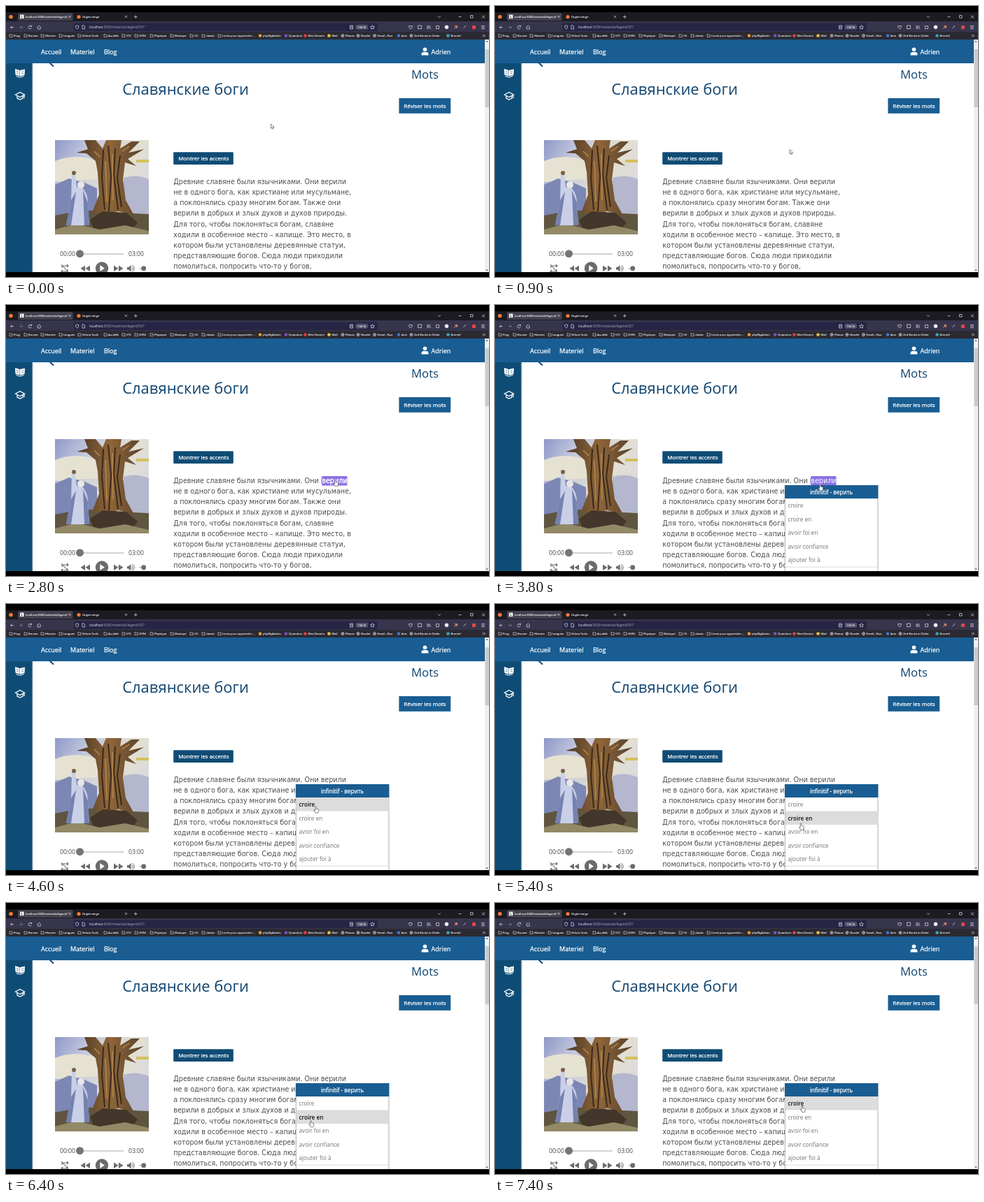
An HTML page that plays this animation: 690x388 px, repeating every 8 s.

```html
<!DOCTYPE html>
<html lang="fr">
<head>
<meta charset="utf-8">
<title>Lecture</title>
<style>
html, body { margin: 0; width: 100%; height: 100%; overflow: hidden; background: #000; }
svg { display: block; width: 100%; height: 100%; }
text { font-family: "Open Sans", "Noto Sans", sans-serif; white-space: pre; }
.chrome text { fill: #f6f6f9; font-size: 4.1px; stroke: #f6f6f9; stroke-width: .1; }
.chrome .tab { font-size: 3.9px; }
.line { fill: none; stroke: #e4e4ea; stroke-width: .8; }
.nav { fill: #fff; font-size: 9px; }
.nav text, .btn { stroke: #fff; stroke-width: .25; }
.head { fill: #0f4470; text-anchor: middle; }
.btn { fill: #fff; font-size: 8px; text-anchor: middle; }
.story text { font: 9.6px "DejaVu Sans", Verdana, sans-serif; fill: #4c4c4c; }
.audio text { font-size: 8.6px; fill: #444; }
.row { font-size: 8.2px; fill: #737373; }
.row.on { font-weight: 600; fill: #111; }
</style>
</head>
<body>
<svg viewBox="0 0 690 388">
  <defs>
    <linearGradient id="sky" x2="1" y2=".6">
      <stop stop-color="#8f98c8"/><stop offset=".3" stop-color="#c3c8de"/>
      <stop offset=".65" stop-color="#e3dfd0"/><stop offset="1" stop-color="#d9d9e2"/>
    </linearGradient>
    <linearGradient id="bark" x2="1">
      <stop stop-color="#4d3826"/><stop offset=".5" stop-color="#8f6638"/><stop offset="1" stop-color="#54402e"/>
    </linearGradient>
    <linearGradient id="edge"><stop stop-color="#0f4c75" stop-opacity=".45"/><stop offset="1" stop-color="#0f4c75" stop-opacity="0"/></linearGradient>
    <clipPath id="frame"><rect x="70" y="192" width="134" height="135"/></clipPath>
    <path id="folder" class="line" d="M0 0h1.6l.6.7h2v3.1H0z" style="stroke-width:.6"/>
    <g id="globe" class="line" style="stroke-width:.5"><circle cx="2" cy="2" r="2.1"/><ellipse cx="2" cy="2" rx=".9" ry="2.1"/><path d="M0 2h4"/></g>
  </defs>

  <!-- page -->
  <rect y="48" width="690" height="333" fill="#fff"/>
  <path d="M69 76l-7 5 6 5.5" fill="none" stroke="#0f4470" stroke-width="1.8"/>
  <rect y="82" width="37.5" height="299" fill="#0f4c75"/>
  <rect x="37.5" y="82" width="2" height="299" fill="url(#edge)"/>
  <rect y="48" width="684" height="34" fill="#195d92"/>
  <g class="nav">
    <text x="50" y="68.5">Accueil</text>
    <text x="92" y="68.5">Materiel</text>
    <text x="140" y="68.5">Blog</text>
    <text x="607.5" y="68.5">Adrien</text>
    <circle cx="598.5" cy="62.3" r="2.8"/>
    <path d="M593.5 70.5v-1.6q0-3 3-3h4q3 0 3 3v1.6z"/>
  </g>
  <g fill="#fff">
    <path d="M13 90l6.500 2v8.500l-6-2zM20 92l7-1.500-.5 8.500-6.500 1.500z"/>
    <path d="M14.500 100.500l5 1.600 6-1.600" fill="none" stroke="#fff"/>
    <path d="M15 93.500l3 .8M15 96l3 .8M22 94.500l3-.7M22 97l3-.7" stroke="#0f4c75" stroke-width=".6"/>
    <path d="M13.500 127l6.500-3.500 6.500 3.500-6.500 3.500zM16 129v3l4 2 4-2v-3M26 127v5" fill="none" stroke="#fff" stroke-width="1.300"/>
  </g>
  <rect x="684" y="48" width="6" height="333" fill="#f0f0f0"/>
  <rect x="684.5" y="62" width="5.5" height="83" fill="#cbcbcb"/>
  <path d="M685.300 51.500l1.700-2 1.700 2zM685.300 377.500l1.700 2 1.700-2z" fill="#555"/>

  <text class="head" x="256.5" y="127" font-size="21.9">Славянские боги</text>
  <text class="head" x="598.5" y="103.5" font-size="16.7">Mots</text>
  <rect x="561.4" y="132" width="73.800" height="21.800" fill="#195d92"/>
  <text class="btn" x="598.5" y="145.700">Réviser les mots</text>
  <rect x="239.2" y="209.300" width="85.600" height="17.600" rx="1.2" fill="#0f4c75"/>
  <text class="btn" x="282.3" y="221" style="font-size:7.9px">Montrer les accents</text>

  <!-- painting -->
  <g clip-path="url(#frame)">
    <rect x="70" y="192" width="134" height="135" fill="url(#sky)"/>
    <path d="M70 222q28-12 62 0v26l-62 4z" fill="#e6e2d2"/>
    <path d="M70 256l20-9 22 6 18 8v46H70z" fill="#7c87b4"/>
    <path d="M168 246q18-6 36 2v54h-36z" fill="#b4b7cd"/>
    <path d="M186 220h18v4h-18z" fill="#d3c05c"/>
    <path d="M70 300l40-8 50 4 44 2v29H70z" fill="#5f5540"/>
    <path d="M112 192h16l10 12 5-12h22l-2 12 16-10h12l-16 16 22-5-23 14 12 10-16-5-3 24 4 30 12 22-22-6-22 4-16-2 10-26-2-32-3-16-13-11-14-1 16-5z" fill="url(#bark)"/>
    <path d="M139 206l-2 40 4 46M146 200l4 44-3 50M156 204l-2 38 6 50M163 214l-4 32 6 42" fill="none" stroke="#3a2a1d" stroke-width="2"/>
    <path d="M142 222l2 58M152 212l1 66M134 216l-8-8M166 208l10-7" fill="none" stroke="#b98b50" stroke-width="1.400"/>
    <path d="M120 306l18-12 34 2 16 14-10 12h-52z" fill="#43362a"/>
    <path d="M70 320l30-8 34 8 36-6 34 8v5H70z" fill="#928a66"/>
    <path d="M94 241l5-1 2 19 8 1q8 8 8 22l2 32H86l7-36z" fill="#c9cfe6"/>
    <path d="M100 266l-7 48h-7l7-36zM110 264l2 50h7l-2-32z" fill="#7581b0"/>
    <circle cx="107" cy="256" r="5" fill="#e9e6e5"/>
    <circle cx="97" cy="239" r="3" fill="#7b5f46"/>
  </g>

  <!-- player -->
  <g class="audio" fill="#6b6b6b">
    <text x="77" y="358.3">00:00</text>
    <text x="175" y="358.3">03:00</text>
    <path d="M105 355h63" stroke="#a6a6a6" stroke-width="1.2"/>
    <circle cx="105.5" cy="354.7" r="5.5" fill="#757575"/>
    <path d="M80 375v-3h8M87 370l2 2-2 2M88 377v3h-8M81 378l-2 2 2 2M79 370l10 11" fill="none" stroke="#666" stroke-width="1.1"/>
    <path d="M113 371.5v8.5l-6.5-4.2zM120 371.5v8.5l-6.5-4.2zM154 371.5v8.5l6.5-4.2zM161 371.5v8.5l6.5-4.2z"/>
    <circle cx="137" cy="375.5" r="9.2"/>
    <path d="M134.3 371v9l6.5-4.5z" fill="#fff"/>
    <path d="M173 374h2.2l3.3-3v9.5l-3.3-3H173z"/>
    <path d="M180 373.5q2 2.300 0 4.600M180.500 371q5.500 4.700 0 9.500" fill="none" stroke="#6b6b6b"/>
    <path d="M190 375.8h10" stroke="#a6a6a6"/>
    <circle cx="196.7" cy="375.7" r="3.4"/>
  </g>

  <g class="story" id="story"></g>
  <g id="hover">
    <rect x="451" y="245" width="36.5" height="13.5" rx="1.5" fill="#8b70e6"/>
    <g class="story"><text id="word" x="451.3" y="255.3" style="fill:#fff;stroke:#fff">верили</text></g>
  </g>

  <g id="popup">
    <rect x="414.2" y="258.5" width="132.8" height="126" fill="#fff" stroke="#8c8c8c" stroke-width=".7"/>
    <rect x="414" y="258" width="133.3" height="19" fill="#195d92"/>
    <text class="btn" x="480.6" y="270.5" style="font-size:8.1px">infinitif - верить</text>
    <rect id="mark" x="414.6" width="132" height="19.5" fill="#dcdcdc"/>
    <path d="M414.5 375.2h132.5" stroke="#ccc" stroke-width=".7"/>
  </g>
  <rect y="381" width="690" height="7"/>

  <!-- browser -->
  <g class="chrome">
    <rect width="690" height="9"/>
    <rect y="9" width="690" height="13.5" fill="#1c1b22"/>
    <rect y="22" width="690" height="15" fill="#37354c"/>
    <rect y="37" width="690" height="11" fill="#2b2a33"/>
    <rect x="17" y="10" width="78.5" height="11" rx="1.5" fill="#42414d"/>
    <rect x="97" y="24.5" width="434" height="11.5" rx="1.5" fill="#272545"/>
    <circle cx="7" cy="15.5" r="2.8" fill="#ef7a35"/>
    <rect x="20" y="12.5" width="5.5" height="5.5" fill="#fff"/>
    <path d="M22 13.5v3.2h2" fill="none" stroke="#222" stroke-width=".7"/>
    <text class="tab" x="28" y="16.8">localhost:3000/materials/legend/</text>
    <circle cx="104" cy="15.5" r="2.6" fill="#ef7a35"/>
    <text class="tab" x="109" y="16.8">Onglet vierge</text>
    <g class="line" style="stroke-width:.7">
      <path d="M89.5 13.8l3 3m0-3l-3 3M170 13.8l3 3m0-3l-3 3M183 15.5h4.5m-2.25-2.25v4.5"/>
      <path d="M617 14.5l2 2 2-2M646.5 15.5h4M663.5 13.5h3.5v3.5h-3.5zM680 13.5l4 4m0-4l-4 4"/>
      <path d="M11 30.5H6.5m2-2l-2 2 2 2"/>
      <path d="M19 30.5h4.5m-2-2l2 2-2 2" stroke="#85858d"/>
      <path d="M36.3 29.3a2.3 2.3 0 1 0 .1 2.3M36.6 27.6v2h-2"/>
      <path d="M44.5 30.5l2.7-2.5 2.7 2.5M45.3 30v3h3.8v-3"/>
      <path d="M99.5 28.5l2.2-.8 2.2.8q0 3.5-2.2 4.8-2.2-1.3-2.2-4.8z"/>
      <path d="M109 27.8h2.3l1.2 1.2v4H109zM491.5 28h4v5h-4zm1 1.5h2m-2 1.5h2"/>
      <path d="M523.5 27.5l.9 1.9 2 .2-1.5 1.4.4 2-1.8-1-1.8 1 .4-2-1.5-1.4 2-.2z"/>
      <path d="M575.8 28.5h4.5v2q-2.2 4-4.5 0zM588.5 28h5v4.5h-5zM602 28v5m1.7-5v5m1.5-5l1.2 5M614.5 28.5h4v4h-4z"/>
      <path d="M640.5 32.5l4-4.5m-3 0l3 4M653.5 32l3.5-4M679 28.5h5m-5 2h5m-5 2h5"/>
      <path d="M681 40.8l1.6 1.7-1.6 1.7m2-3.4l1.6 1.7-1.6 1.7"/>
    </g>
    <circle cx="629.5" cy="30.3" r="2.7" fill="#f1f1f1"/>
    <circle cx="643.5" cy="29.5" r="1.8" fill="#e77b48"/>
    <rect x="666" y="28" width="5" height="5" fill="#df4545"/>
    <text x="119" y="32" style="font-size:4.64px;stroke:none">localhost<tspan fill="#aaaab4">:3000/materials/legend/537</tspan></text>
    <rect x="499.5" y="26.8" width="17.5" height="7" rx="2" fill="#55536a"/>
    <text x="508.3" y="31.9" text-anchor="middle">150 %</text>
    <g id="marks"></g>
  </g>

  <path id="arrow" d="M0 0v6.3l1.5-1.4 1 2.3 1.1-.5-1-2.2h2z" fill="#fff" stroke="#333" stroke-width=".6"/>
  <path id="hand" d="M-.8.6q.8-1.2 1.6 0v2.8l2.9.8q.8.3.6 1.3l-.5 2.4-.6 1.5h-3.4l-2.2-3.2q-.3-1.2.9-.8l.7.7z" fill="#fff" stroke="#333" stroke-width=".6"/>
</svg>
<script>
const $ = id => document.getElementById(id);

function add(parent, tag, attrs, content = '') {
  const el = document.createElementNS('http://www.w3.org/2000/svg', tag);
  for (const key in attrs) el.setAttribute(key, attrs[key]);
  el.textContent = content;
  return parent.appendChild(el);
}

// Label, x of the label, icon: a colour, "globe" or a folder by default
const bookmarks = [
  ['Prog', 11], ['Bourse', 32], ['Histoire', 56], ['Langues', 82], ['Velora Tools', 109],
  ['Au-delà', 146], ['VTC', 172], ['OVNI', 190], ['Physique', 212], ['Musique', 241],
  ['US', 269], ['classic', 286], ['Livres pour apprendre ...', 309],
  ['phpMyAdmin', 367, '#e99a3c'], ['Quandoro', 404, '#7d4fc4'], ['Mes Devoirs', 431.5, '#df3f3f'],
  ['Mail', 465.5, '#e8c33b'], ['Planza', 485, 'globe'], ['Nowlet', 507, 'globe'],
  ['Email - Nuo', 530.5, 'globe'], ['Avis', 565, '#3b79c9'], ['Zed Books in Order', 583, 'globe'],
  ['Brontel', 635.5, '#3aa7b5']
];
for (const [label, x, icon = 'folder'] of bookmarks) {
  add($('marks'), 'text', { x, y: 44 }, label);
  if (icon[0] === '#') add($('marks'), 'circle', { cx: x - 4, cy: 42.5, r: 2.3, fill: icon });
  else add($('marks'), 'use', { href: '#' + icon, x: x - 6, y: 40.5 });
}

const story = [
  'Древние славяне были язычниками. Они верили',
  'не в одного бога, как христиане или мусульмане,',
  'а поклонялись сразу многим богам. Также они',
  'верили в добрых и злых духов и духов природы.',
  'Для того, чтобы поклоняться богам, славяне',
  'ходили в особенное место – капище. Это место, в',
  'котором были установлены деревянные статуи,',
  'представляющие богов. Сюда люди приходили',
  'помолиться, попросить что-то у богов,'
];
story.forEach((s, i) => add($('story'), 'text', { x: 239.3, y: 255.3 + i * 15.06 }, s));

const rowTop = 277, rowHeight = 19.5;
const rows = ['croire', 'croire en', 'avoir foi en', 'avoir confiance', 'ajouter foi à'].map((s, i) =>
  add($('popup'), 'text', { class: 'row', x: 418.5, y: rowTop + 13.2 + i * rowHeight }, s));

// Pointer tip: time, x, y
const path = [
  [0, 378.5, 169], [900, 421, 205.5], [1800, 448, 229], [2500, 470.5, 250], [3400, 470.5, 250],
  [3800, 464.5, 256.5], [4300, 447, 283], [4700, 441, 292], [5200, 438, 309], [5400, 437, 313.8],
  [5600, 437.5, 321], [5800, 435.5, 311.3], [6800, 435.5, 311.3], [7200, 439, 289.3],
  [7300, 439, 289.3], [7400, 439, 290], [8000, 439, 290]
];

function pointer(t) {
  const i = path.findIndex(p => p[0] > t);
  const [t0, x0, y0] = path[i - 1], [t1, x1, y1] = path[i];
  const k = (t - t0) / (t1 - t0);
  return [x0 + (x1 - x0) * k, y0 + (y1 - y0) * k];
}

const show = (id, on) => $(id).style.display = on ? '' : 'none';

function draw(now) {
  const t = Math.floor(now % 8000 / 100) * 100;
  const [x, y] = pointer(t);
  const open = t >= 3000;
  const onWord = x > 451 && y > 245 && y < 259;
  const row = open ? Math.floor((y - rowTop) / rowHeight) : -1;

  show('popup', open);
  show('hover', onWord);
  $('word').style.strokeWidth = open ? 0 : .4;
  show('mark', row >= 0);
  $('mark').setAttribute('y', rowTop + Math.max(row, 0) * rowHeight);
  rows.forEach((el, i) => el.classList.toggle('on', i === row));

  const hand = onWord || open;
  show('hand', hand);
  show('arrow', !hand);
  $(hand ? 'hand' : 'arrow').setAttribute('transform', `translate(${x} ${y})`);
  requestAnimationFrame(() => draw(performance.now()));
}
draw(0);
</script>
</body>
</html>
```
